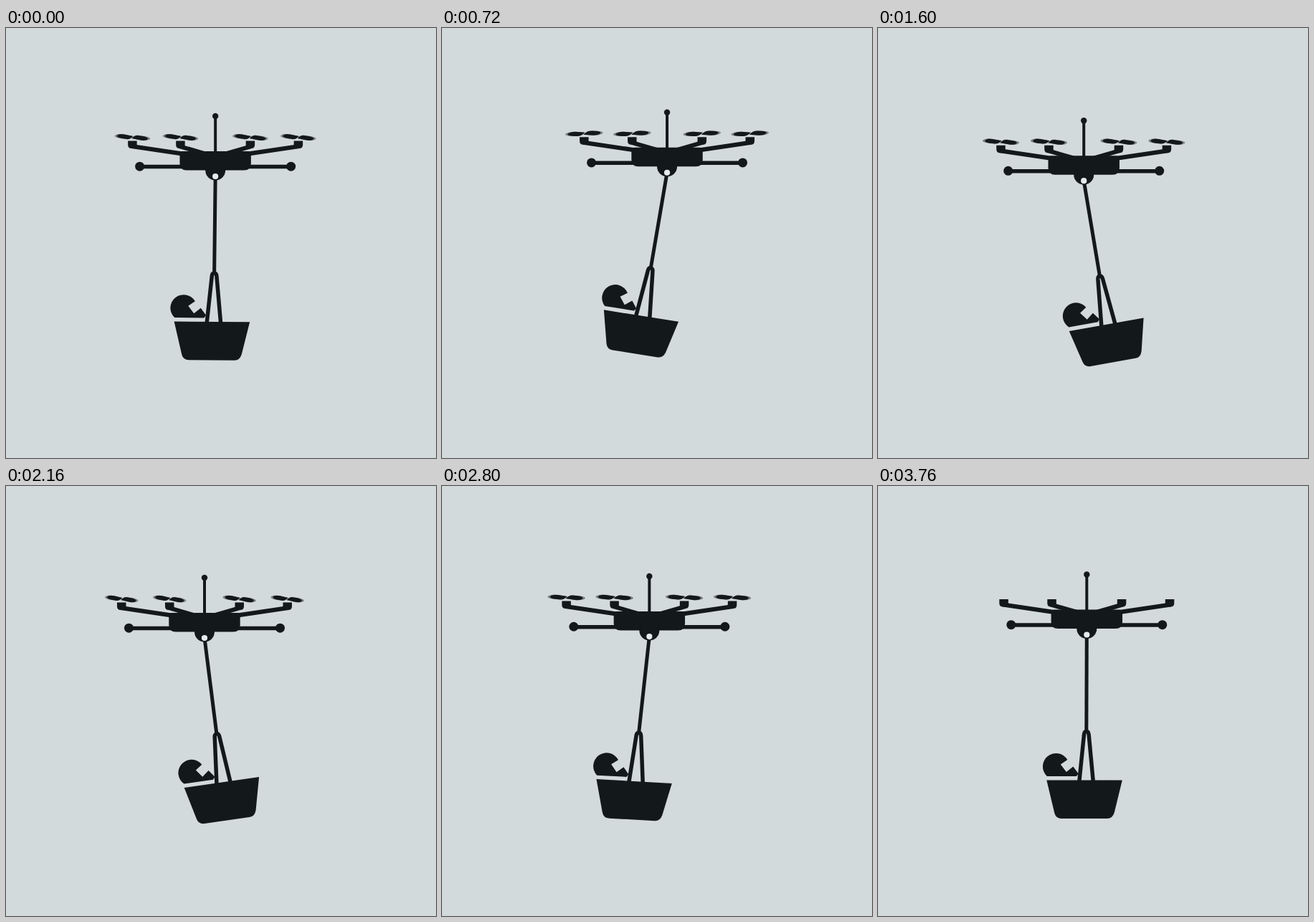
An HTML page for the animation above (3.84 s loop, 600x600 px).

```html
<!DOCTYPE html>
<html lang="en">
<head>
<meta charset="utf-8">
<title>Drone and basket</title>
<style>
html, body { margin: 0; width: 100%; height: 100%; overflow: hidden; background: #d2dadc; }
svg { display: block; width: 100vw; height: 100vh; }
.ink { fill: #13181b; stroke: none; }
.bar { fill: none; stroke: #13181b; }
.blur { opacity: .45; }
</style>
</head>
<body>
<svg viewBox="0 0 600 600">
  <defs>
    <g id="arms">
      <path class="ink" d="M109.5 34.5H122V40Q122 45 117 45H109.5ZM42.5 34.5H55V40Q55 45 50 45H42.5Z"/>
      <path class="bar" stroke-width="6" d="M117 42L46 52.5M50 42L12 53"/>
      <path class="bar" stroke-width="5.5" d="M40 70.6H105"/>
      <circle class="ink" cx="105.5" cy="70.2" r="6.5"/>
    </g>
    <g id="rotor">
      <path class="ink blur"/><path class="ink blur" transform="rotate(180)"/>
      <path class="ink"/><path class="ink" transform="rotate(180)"/>
    </g>
  </defs>
  <path id="rope" class="bar" stroke-width="5"/>
  <g id="basket">
    <path class="bar" stroke-width="5.5" d="M-10 70L-3.3 4Q-2.8 0 0 0Q2.8 0 3.3 4L9.5 70"/>
    <path class="ink" d="M-55.5 68H50L39 113Q36.5 121.5 29 121.5H-34.5Q-42.5 121.5-44.5 114Z"/>
    <path class="ink" d="M-55 62.5H-14L-11 59L-18.5 49L-28 56.5L-36 46L-26.5 39.5A18.5 18.5 0 1 0-55 62.5Z"/>
  </g>
  <g id="drone">
    <use href="#arms"/>
    <use href="#arms" transform="scale(-1 1)"/>
    <path class="bar" stroke-width="4" d="M0 0V52"/>
    <circle class="ink" r="4.2"/>
    <path class="ink" d="M-45.5 49H45.5Q49.7 49 49.7 53V66Q49.7 75.5 40 75.5H-40Q-49.7 75.5-49.7 66V53Q-49.7 49-45.5 49Z"/>
    <circle class="ink" cy="75.5" r="14"/>
    <circle cy="84" r="4.1" fill="#e6ecee"/>
    <g id="rotors">
      <use href="#rotor" x="-115.7" y="29.5"/>
      <use href="#rotor" x="-48.7" y="29.5"/>
      <use href="#rotor" x="48.7" y="29.5"/>
      <use href="#rotor" x="115.7" y="29.5"/>
    </g>
  </g>
</svg>
<script>
const STEP = 80, COUNT = 48, ROPE = 135;

// Turning points as [step, value]; the motion eases from one to the next
const driftX = [[0, 291], [8, 313.5], [14, 314.5], [25, 275.5], [30, 277.3], [43, 304], [COUNT, 291]];
const driftY = [[0, 123.5], [6, 116.2], [25, 130.7], [32, 123.7], [42, 130.5], [COUNT, 123.5]];
const swing = [[0, 0], [8, 11.5], [18, -9.6], [24, -9.8], [43, 12.8], [COUNT, 0]];
const tilt = [[0, 0], [8, 11], [18, -10], [24, -10.2], [43, 8.9], [COUNT, 0]];

const $ = id => document.getElementById(id);
const rad = deg => deg * Math.PI / 180;
const blades = [...$('rotor').children];

function at(path, n) {
  const i = path.findIndex(p => p[0] > n);
  const [a, from] = path[i - 1], [b, to] = path[i];
  return from + (to - from) * (1 - Math.cos(Math.PI * (n - a) / (b - a))) / 2;
}

function blade(size, phase) {
  const x = size * Math.cos(rad(phase)), y = 5 * Math.sin(rad(phase));
  return `M-1 1.5Q4-4 ${x * .45} ${y * .5 - 3.3}Q${x} ${y - 3} ${x} ${y}` +
    `Q${x * .9} ${y + 3.5} ${x * .5} ${y * .5 + 3}Z`;
}

function draw(n) {
  const x = at(driftX, n) + .3, y = at(driftY, n), eye = y + 84;
  const angle = rad(at(swing, n));
  const hx = x - ROPE * Math.sin(angle) - .5, hy = eye + ROPE * Math.cos(angle);
  $('drone').setAttribute('transform', `translate(${x} ${y})`);
  $('rope').setAttribute('d', `M${x} ${eye}L${hx} ${hy}`);
  $('basket').setAttribute('transform', `translate(${hx} ${hy}) rotate(${at(tilt, n)})`);

  // Rotors are absent while the drone is at rest
  $('rotors').style.display = n ? '' : 'none';
  const phase = 13 + 25 * Math.sin(rad(107.4 * n - 84));
  blades.forEach((el, i) => el.setAttribute('d', blade(i < 2 ? 27 : 23.5, phase)));
}

const start = performance.now();
function tick() {
  draw((Math.floor((performance.now() - start) / STEP) + 1) % COUNT);
  requestAnimationFrame(tick);
}
tick();
</script>
</body>
</html>
```
